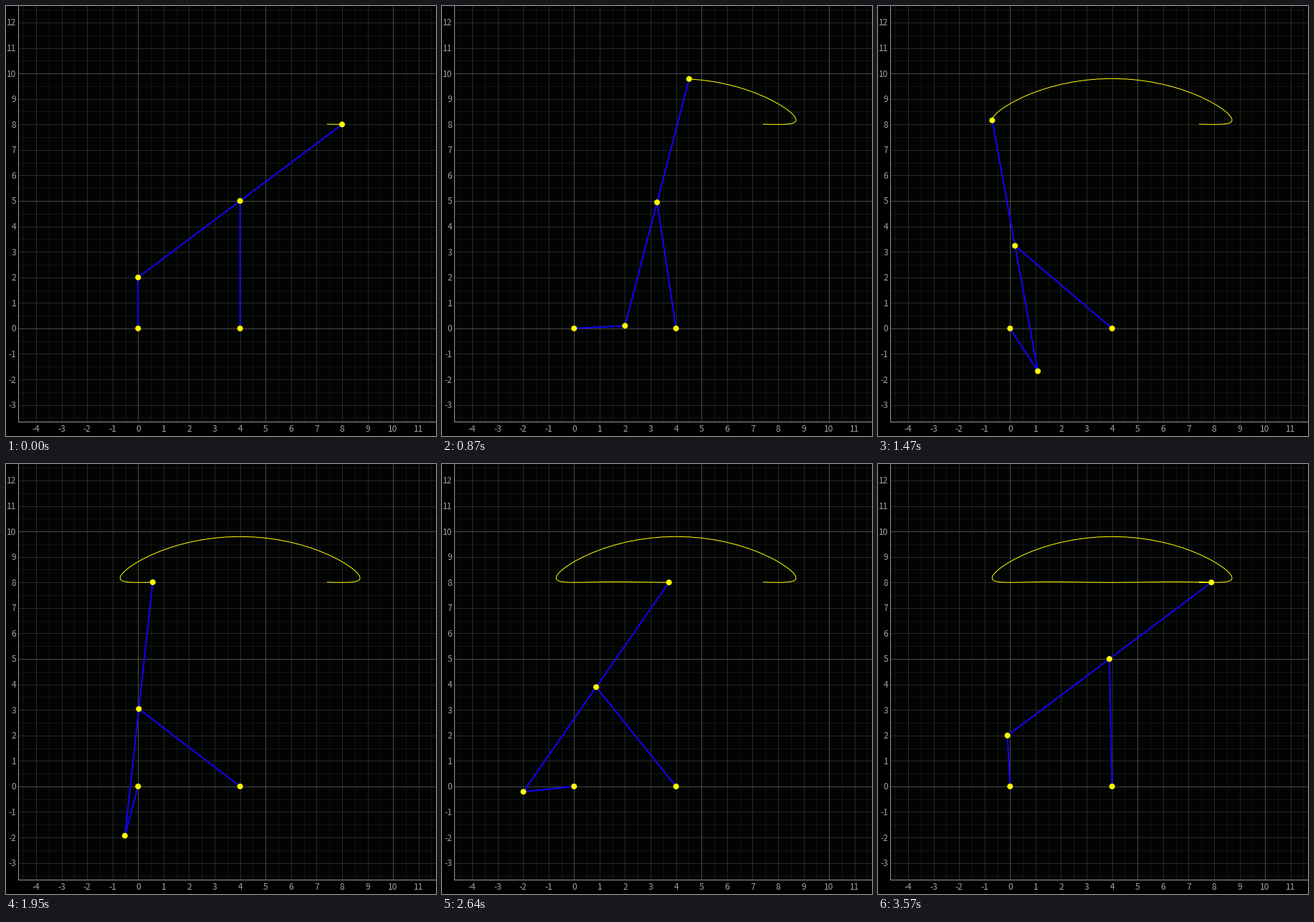
A matplotlib script for the animation above (3.6 s loop, 600 px wide and 600 px high).

```python
import numpy as np
import matplotlib.pyplot as plt
from matplotlib.animation import FuncAnimation

SIZE, DPI = 600, 100
FRAMES, INTERVAL = 120, 30
PX = 72 / DPI                       # one pixel in points
LEFT, BOTTOM = 17, 580              # axis lines
X0, Y0, UNIT = 184.3, 449.9, 35.58  # origin and scale in pixels
CRANK, ROD, BASE = 2.0, 5.0, 4.0
LEAD = 5                            # trail steps made before the loop starts
GREY, TEXT, BLUE, YELLOW = "#969696", "#a4a4a4", "#1400ff", "#ffff00"


def to_px(points):
    points = np.asarray(points, dtype=float)
    return X0 + UNIT * points[..., 0], Y0 - UNIT * points[..., 1]


def linkage(step):
    """Crank pin, rocker joint and tracing point at a given step."""
    a = np.radians(90 - 360 / FRAMES * step)
    pin = CRANK * np.array([np.cos(a), np.sin(a)])
    gap = np.array([BASE, 0]) - pin
    dist = np.hypot(*gap)
    normal = np.array([-gap[1], gap[0]]) / dist
    joint = pin + gap / 2 + normal * np.sqrt(ROD**2 - dist**2 / 4)
    return pin, joint, 2 * joint - pin


fig = plt.figure(figsize=(SIZE / DPI, SIZE / DPI), dpi=DPI, facecolor="black")
ax = fig.add_axes([0, 0, 1, 1])
ax.set_xlim(0, SIZE)
ax.set_ylim(SIZE, 0)
ax.axis("off")
ax.add_patch(plt.Rectangle((LEFT, 0), SIZE - LEFT, BOTTOM, color="#020402", lw=0, zorder=0))


def rule(xs, ys, alpha):
    # Pixel-centred coordinates stay crisp only without snapping.
    ax.plot(xs, ys, color=GREY, alpha=alpha, lw=PX, snap=False,
            solid_capstyle="butt", zorder=1)


def grid_alpha(half):
    return 0.48 if half % 10 == 0 else 0.25 if half % 2 == 0 else 0.11


def label(x, y, n, align):
    ax.text(x, y + 4.5, str(n), color=TEXT, fontsize=12 * PX,
            family="Noto Sans CJK JP", ha=align, va="baseline")


for half in range(-9, 26):
    x, y = (np.round(v) + 0.5 for v in to_px([half / 2, half / 2]))
    if LEFT < x < SIZE:
        rule([x, x], [0, BOTTOM], grid_alpha(half))
    if 0 < y < BOTTOM:
        rule([LEFT, SIZE], [y, y], grid_alpha(half))
rule([LEFT + 0.5] * 2, [0, BOTTOM + 1], 1)
rule([LEFT, SIZE], [BOTTOM + 0.5] * 2, 1)

for n in range(-4, 12):
    label(X0 + UNIT * n, 590, n, "center")
for n in range(-3, 13):
    label(14.5, Y0 - UNIT * n, n, "right")

path = np.array([linkage(s)[2] for s in range(-LEAD, FRAMES)])
rods = [ax.plot([], [], color=BLUE, lw=2 * PX, snap=False, zorder=3)[0] for _ in range(3)]
trail, = ax.plot([], [], color=YELLOW, lw=PX, snap=False, zorder=4)
dots = [ax.add_patch(plt.Circle((0, 0), 4, color=YELLOW, lw=0, zorder=5)) for _ in range(5)]


def draw(step):
    pin, joint, tip = linkage(step)
    origin, pivot = (0, 0), (BASE, 0)
    for rod, ends in zip(rods, ([origin, pin], [pin, tip], [pivot, joint])):
        rod.set_data(*to_px(ends))
    trail.set_data(*to_px(path[:step + LEAD + 1]))
    for dot, point in zip(dots, (origin, pivot, pin, joint, tip)):
        dot.center = to_px(point)
    return [*rods, trail, *dots]


anim = FuncAnimation(fig, draw, frames=FRAMES, interval=INTERVAL, repeat=True,
                     repeat_delay=0, blit=False)
plt.show()
```
